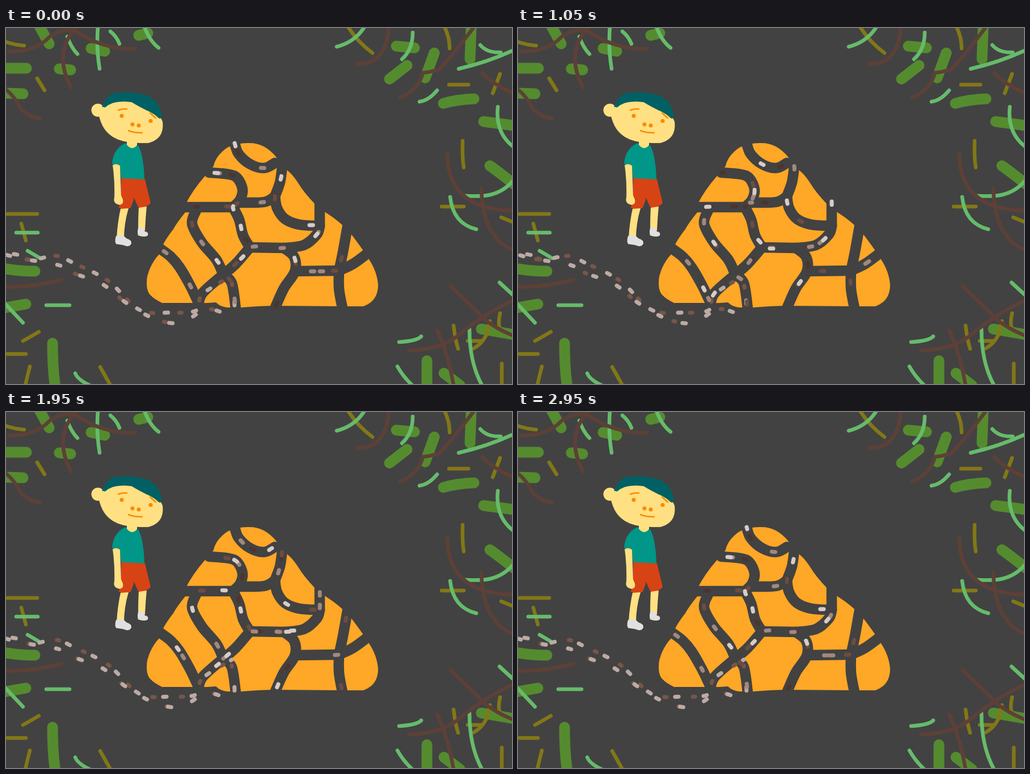
Recreate the animation shown at these times as an HTML page. Size 892 px wide and 628 px high, loop 3 s.

```html
<!DOCTYPE html>
<html lang="en">
<head>
<meta charset="utf-8">
<title>Ant hill</title>
<style>
html, body { margin: 0; width: 100%; height: 100%; overflow: hidden; background: #424242; }
svg { display: block; width: 100%; height: 100%; }
.line { fill: none; stroke-linecap: round; stroke-linejoin: round; stroke-width: 6.5; }
.leaf { stroke: #558b2f; stroke-width: 19; }
.stem { stroke: #66bb6a; }
.twig { stroke: #827717; }
.vine { stroke: #5d4037; }
.tunnel { stroke: #424242; stroke-width: 18.5; }
.face { stroke: #fb8c00; stroke-width: 2.5; }
.skin { fill: #ffe082; }
.ants { stroke-width: 7; animation: march 3s steps(60) infinite; }
#trail .ants { animation: march 1s steps(20) infinite; }
.white { stroke: #d7ccc8; }
.tan { stroke: #a1887f; }
.brown { stroke: #6d4c41; }
.dark { stroke: #4e342e; }
.pale { stroke: #bcaaa4; }
.earth { stroke: #795548; }
.stray { fill: #6d4c41; opacity: 0; animation: blink 1s step-end infinite; }
@keyframes march {
  from { stroke-dashoffset: var(--from); }
  to { stroke-dashoffset: var(--to); }
}
@keyframes blink { 0% { opacity: 0; } 45% { opacity: 1; } 55% { opacity: 0; } }
</style>
</head>
<body>
<svg viewBox="0 0 892 628" preserveAspectRatio="none">
  <!-- Undergrowth -->
  <path class="line leaf" d="M58-5L76 28M0 71H36M94 72L114 74M0 115L30 116M150 36L174 41M234 13L250 9M688 32L720 35M820 0L818 55M676 90L707 66M755 44L739 88M771 133Q795 126 825 125M842 165L895 172M853 243Q870 255 895 275M-5 424Q20 429 51 429M-5 494L35 487M82 556Q82 600 87 635M742 587V635M772 609L800 630M838 531L895 541"/>
  <path class="line twig" d="M-2 24Q15 30 32 31M55 89L68 110M603-2Q620 25 646 44M772-4Q782 15 782 36M781 100H815M871 81L858 115M805 199Q804 230 807 246M768 315H807M873 334L895 343M-2 328H55M27 345L35 375M58 536L30 552M-2 575H35M42 597L34 630M166 598L184 630M789 525Q792 550 797 566M871 503Q866 525 873 536M814 552H840M825 565Q850 550 853 517M874 592V630"/>
  <path class="line stem" d="M108 15Q115 35 126 46M162-2Q159 35 165 72M184 6Q195 15 200 28M243-5Q252 22 269 35M583 33Q615 25 632-2M717 8Q717 38 698 55M836 30Q848 44 872 43M798 72Q850 60 895 39M729 130Q745 128 760 110M867 139Q862 185 895 210M810 296C840 298 870 298 895 268M783 298Q788 345 829 355M18 361H56M38 393L60 406M71 489H112M-2 486L30 520M122 609Q126 620 147 630M693 554Q725 552 732 544M817 531Q817 590 839 630M690 597Q700 615 716 630M870 449L895 472"/>
  <path class="line vine" d="M5 42Q45 42 70 22Q90 0 122 5Q170 38 228 37M124-2Q82 45 115 105M-2 107Q15 120 27 143Q40 158 60 159M675-2Q670 65 620 63M825-2Q790 45 765 72Q750 78 735 79Q728 108 695 123M840 80Q860 100 895 116M778 222Q778 320 895 322M838 284Q840 370 895 392M-2 457Q50 457 99 444M784 455L830 500Q850 525 895 543M710 569Q770 567 800 540Q850 500 895 480M760 533Q778 570 789 630"/>

  <!-- Boy -->
  <path class="skin" d="M163 150Q168 129 205 128Q262 128 276 165Q280 195 251 203C215 203 172 203 163 150Z"/>
  <circle class="skin" cx="162" cy="145" r="11.5"/>
  <path fill="#006064" d="M169 139Q180 113 197 114Q225 113 241 117Q272 125 275 158Q271 162 267 157C258 148 240 143 222 131Q190 126 175 140Z"/>
  <path fill="#009688" d="M211 203Q222 215 233 207Q243 225 244 269L203 267L201 245Q188 245 187 238Q190 212 211 203Z"/>
  <path class="skin" d="M213 195H231V207Q222 217 213 206Z"/>
  <path fill="#d84315" d="M203 265L245 267L255 309Q243 320 233 316L226 300L220 317Q207 322 199 317L203 300Z"/>
  <path class="skin" d="M188 242Q195 238 201 243L203 296Q211 310 200 312Q188 310 191 299Q192 270 188 242ZM202 319L216 318Q208 345 208 372L195 370Q197 340 202 319ZM234 317L248 315Q246 335 245 357L233 357Q233 335 234 317Z"/>
  <path fill="#e0e0e0" d="M194 367Q205 362 212 371Q222 374 221 380Q218 388 207 383L194 381Q191 376 194 367ZM233 353Q243 350 245 359Q252 360 250 366Q245 370 233 366Q231 360 233 353Z"/>
  <path class="line face" d="M198 145Q206 142 213 143M254 150L264 159M216 181Q225 185 240 185"/>
  <g fill="#fb8c00">
    <circle cx="204" cy="155" r="3.6"/><circle cx="255" cy="164" r="3.6"/>
    <circle cx="223" cy="170" r="3.6"/><circle cx="234" cy="172" r="3.6"/>
  </g>

  <!-- Hill -->
  <path fill="#ffa726" d="M249 438Q246 458 252 468Q258 477 275 485H330Q350 486 370 484Q378 492 390 493H415Q450 490 475 490L600 491H630Q655 482 656 455Q655 430 638 405Q625 385 608 363Q590 342 563 325L545 311Q525 290 516 275Q505 257 493 249L475 226Q455 203 430 203Q408 202 390 211Q370 225 366 243Q360 255 350 262Q330 285 318 308L317 324Q300 345 295 355Q275 380 271 398Q255 415 249 438Z"/>
  <g id="tunnels"></g>
  <circle class="stray" cx="808" cy="451" r="3.5"/>
  <g id="trail"></g>
  <g id="hill"></g>
</svg>
<script>
// Each tunnel is both dug into the hill and walked by the ants
const tunnels = {
  top: '403,203 410,222 430,240 455,247 474,238',
  shaft: '487,244 483,272 474,297',
  ramp: '474,297 478,318 492,337 518,347 553,349',
  bridge: '474,297 455,307 409,308',
  loop: '400,316 412,304 417,285 408,265 392,258 358,255',
  gate: '316,316 400,316',
  spine: '400,316 411,338 418,366 430,387',
  hall: '430,387 490,388',
  bend: '490,388 525,383 548,364 553,349',
  chimney: '553,349 553,306',
  fork: '336,320 328,345 345,378 371,409 383,435',
  foot: '383,435 398,450 405,495',
  slope: '430,387 405,416 383,435',
  root: '383,435 347,467 339,488',
  flank: '270,388 290,403 306,422 324,453 337,480',
  well: '490,388 508,404 509,430 490,459 475,492',
  shelf: '510,429 587,428',
  ledge: '587,428 612,416 638,397',
  pit: '602,350 594,395 587,428',
  drop: '587,428 587,460 593,494'
};

const points = text => text.split(' ').map(s => s.split(',').map(Number));

// Smooth curve through a list of points
function curve(p) {
  const at = i => p[Math.max(0, Math.min(p.length - 1, i))];
  const handle = (i, side) => [0, 1].map(n => at(i)[n] + side * (at(i + 1)[n] - at(i - 1)[n]) / 6);
  return p.reduce((d, point, i) =>
    i ? d + 'C' + [handle(i - 1, 1), handle(i, -1), point] : 'M' + point, '');
}

function draw(parent, kind, p) {
  const el = document.createElementNS('http://www.w3.org/2000/svg', 'path');
  el.setAttribute('class', 'line ' + kind);
  el.setAttribute('d', curve(p));
  document.getElementById(parent).append(el);
  return el;
}

// Ants sit every `gap` px from `start` and advance one gap per cycle
function ants(parent, p, color, start, gap, dir = 1, size = 6) {
  const el = draw(parent, 'ants ' + color, p);
  const from = size / 2 - start;
  el.style.strokeDasharray = size + ' ' + (gap - size);
  el.style.setProperty('--from', from + 'px');
  el.style.setProperty('--to', from - dir * gap + 'px');
}

// A route lists tunnels in walking order; "-" walks one backwards
function route(names, crew, gap = 120) {
  const p = names.split(' ').flatMap(name => {
    const part = points(tunnels[name.replace('-', '')]);
    return name.endsWith('-') ? part.reverse() : part;
  });
  const path = p.filter((q, i) => !i || String(q) !== String(p[i - 1]));
  for (const color in crew) ants('hill', path, color, crew[color], gap);
}

for (const name in tunnels) draw('tunnels', 'tunnel', points(tunnels[name]));

const upper = points('-3,396 25,401 45,409 88,402 120,415 180,446 235,497 290,502 336,498 346,470 398,437');
const lower = points('-3,399 28,407 92,418 118,432 170,452 212,485 262,513 308,520 354,496 400,503 398,447');
ants('trail', upper, 'earth', 45, 50, -1, 4);
ants('trail', lower, 'earth', 42, 90, -1, 3);
ants('trail', upper, 'pale', 20, 50);
ants('trail', lower, 'pale', 8, 45);

route('top-', { dark: 77 }, 100);
route('shaft bridge', { dark: 55 });
route('shaft ramp', { brown: 57 }, 145);
route('loop', { brown: 8, dark: 70, tan: 95 }, 110);
route('gate spine slope', { dark: 150, brown: 75 }, 130);
route('fork foot', { brown: 28 });
route('hall well', { brown: 95, dark: 58 });
route('shelf-', { brown: 8 });
route('pit drop', { brown: 58 });
route('top shaft bridge', { tan: 71 });
route('foot- fork-', { tan: 135 });
route('hall bend chimney', { tan: 57 }, 140);
route('chimney- bend- hall- slope', { tan: 57 });
route('flank', { tan: 13 }, 75);
route('shelf ledge', { tan: 46 }, 185);
route('ledge- shelf-', { tan: 107 });
route('top shaft ramp bend- well', { white: 3 }, 128);
route('gate spine hall bend chimney', { white: 126 }, 165);
route('root- fork-', { white: 98 });
route('slope- spine- loop', { white: 45 }, 100);
route('flank-', { white: -36 }, 165);
</script>
</body>
</html>
```
